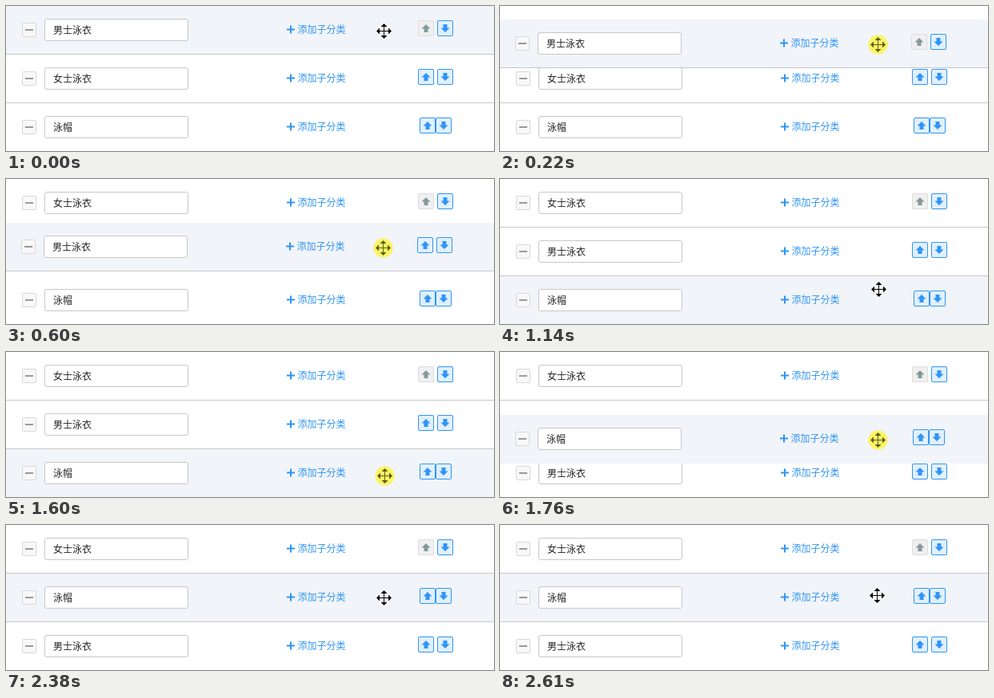
An HTML page for the animation above (2.69 s loop, 610x182 px).

```html
<!DOCTYPE html>
<html lang="zh-CN">
<head>
<meta charset="utf-8">
<style>
  html, body { margin: 0; width: 610px; height: 182px; overflow: hidden; background: #fff; }
  svg { display: block; }
  text { font: 12px "Noto Sans CJK SC", "Noto Sans CJK", sans-serif; fill: #222; }
  .bg { fill: #fff; }
  .hover .bg { fill: #f1f4f9; }
  .line { fill: #c8c8c8; }
  .box { fill: #fff; stroke: #c8c8c8; }
  .minus { fill: #f8f8f8; stroke: #d8d8d8; }
  .dash { fill: #979a9b; }
  .link { fill: #3095f3; }
  .btn rect { fill: #e1f0ff; stroke: #3095f7; }
  .btn path { fill: #3095f7; }
  .btn.off rect { fill: #f0f0f0; stroke: #ddd; }
  .btn.off path { fill: #85999b; }
  .halo { fill: #fbf566; stroke: #fbf566; stroke-width: 2; stroke-opacity: .4; visibility: hidden; }
  .down .halo { visibility: visible; }
  .arrows { fill: #000; stroke: #fff; stroke-width: 2; paint-order: stroke; }
  .down .arrows { fill: #5e5b16; stroke: #fbf566; }
</style>
</head>
<body>
<svg id="stage" width="610" height="182" viewBox="0 0 610 182">
  <g id="rows"></g>
  <g id="cursor">
    <circle class="halo" r="11.7"/>
    <path class="arrows"/>
  </g>
</svg>
<script>
const LOOP = 2690, PITCH = 61;
const list = document.getElementById('rows');
const cursor = document.getElementById('cursor');

// gap: space between the two arrow buttons
const items = [
  { name: '男士泳衣', left: 515, gap: 4 },
  { name: '女士泳衣', left: 515, gap: 4 },
  { name: '泳帽', left: 517, gap: 0 }
];

// Pointer moves between two points in equal steps; lead makes the start quicker.
const moves = [
  { start: 60, end: 600, steps: 7, a: [472, 31], b: [471, 86], lead: .8 },
  { start: 920, end: 1370, steps: 6, a: [471, 86], b: [473, 155], lead: .56 },
  { start: 1600, end: 2080, steps: 6, a: [473, 155], b: [472, 91], lead: .41 },
  { start: 2380, end: 2610, steps: 3, a: [472, 91], b: [471, 88], lead: 1 }
];

// Each drag follows one pointer move and ends when the next begins.
const drags = [
  { item: 0, by: moves[0], drop: moves[1].start, dist: 55, swap: [1, 0, 2] },
  { item: 2, by: moves[2], drop: moves[3].start, dist: -62, swap: [1, 2, 0] }
];

const smooth = p => p * p * (3 - 2 * p);
const mix = (a, b, p) => Math.round(a + (b - a) * p);

function progress({ start, end, steps, lead }, t) {
  const step = Math.floor((t - start) / (end - start) * steps + .1);
  return smooth(Math.min(1, Math.max(0, step / steps)) ** lead);
}

function stateAt(t) {
  const path = moves.findLast(m => t >= m.start) || moves[0];
  const p = progress(path, t);
  const state = {
    x: mix(path.a[0], path.b[0], p),
    y: mix(path.a[1], path.b[1], p),
    order: [0, 1, 2], held: -1, dy: 0
  };
  for (const { item, by, drop, dist, swap } of drags) {
    if (t < by.start) break;
    const dy = mix(0, dist, progress(by, t));
    if (Math.abs(dy) > PITCH / 2) state.order = swap;
    if (t < drop) Object.assign(state, { held: item, dy });
  }
  return state;
}

const button = (x, up) => `<g class="btn ${up ? 'up' : ''}" transform="translate(${x} 18)">
  <rect x=".5" y=".5" width="19" height="19" rx="1.5"/>
  <path d="M10 5L15.5 10.5H12.5V15H7.5V10.5H4.5Z" ${up ? '' : 'transform="rotate(180 10 10)"'}/></g>`;

const rows = items.map(({ name, left, gap }) => {
  const g = document.createElementNS('http://www.w3.org/2000/svg', 'g');
  g.innerHTML = `<rect class="bg" width="611" height="61"/>
    <rect class="line" y="60" width="611" height="1"/>
    <rect class="minus" x="20.5" y="21.5" width="17" height="17" rx="1.5"/>
    <rect class="dash" x="24" y="29" width="10" height="2"/>
    <rect class="box" x="48.5" y="16.5" width="179" height="27" rx="2.5"/>
    <text x="59" y="35">${name}</text>
    <path class="link" d="M351 28.5H355V24.5H357V28.5H361V30.5H357V34.5H355V30.5H351Z"/>
    <text class="link" x="364.5" y="34">添加子分类</text>
    ${button(left, true)}${button(left + 20 + gap, false)}`;
  list.append(g);
  return g;
});

// four-way pointer: one arrow drawn at each quarter turn
const quarter = ['0 -9.5', '4 -5.5', '.5 -5.5', '.5 -.5'].map(s => s.split(' ').map(Number));
const outline = [0, 1, 2, 3].flatMap(turn => {
  const half = [[-.5, -5.5], [-4, -5.5], ...quarter];
  return half.map(([x, y]) => {
    for (let i = 0; i < turn; i++) [x, y] = [-y, x];
    return `${x} ${y}`;
  });
});
cursor.querySelector('.arrows').setAttribute('d', `M${outline.join('L')}Z`);

const place = (el, x, y) => el.setAttribute('transform', `translate(${x} ${y})`);

function draw({ x, y, order, held, dy }, t) {
  const active = held < 0 ? order[Math.floor(y / PITCH)] : held;
  rows.forEach((row, i) => {
    const slot = order.indexOf(i);
    if (i === held) place(row, dy ? -1 : 0, i * PITCH + dy);
    else place(row, 0, slot * PITCH);
    row.classList.toggle('hover', i === active);
    row.querySelector('.up').classList.toggle('off', slot === 0);
  });
  // the last row carries no divider until it is dropped elsewhere
  rows[2].querySelector('.line').style.display = t < drags[1].drop ? 'none' : '';
  list.append(rows[active]);
  place(cursor, x + .5, y + .5);
  cursor.classList.toggle('down', held >= 0);
}

function tick() {
  const t = performance.now() % LOOP;
  draw(stateAt(t), t);
  requestAnimationFrame(tick);
}
tick();
</script>
</body>
</html>
```
